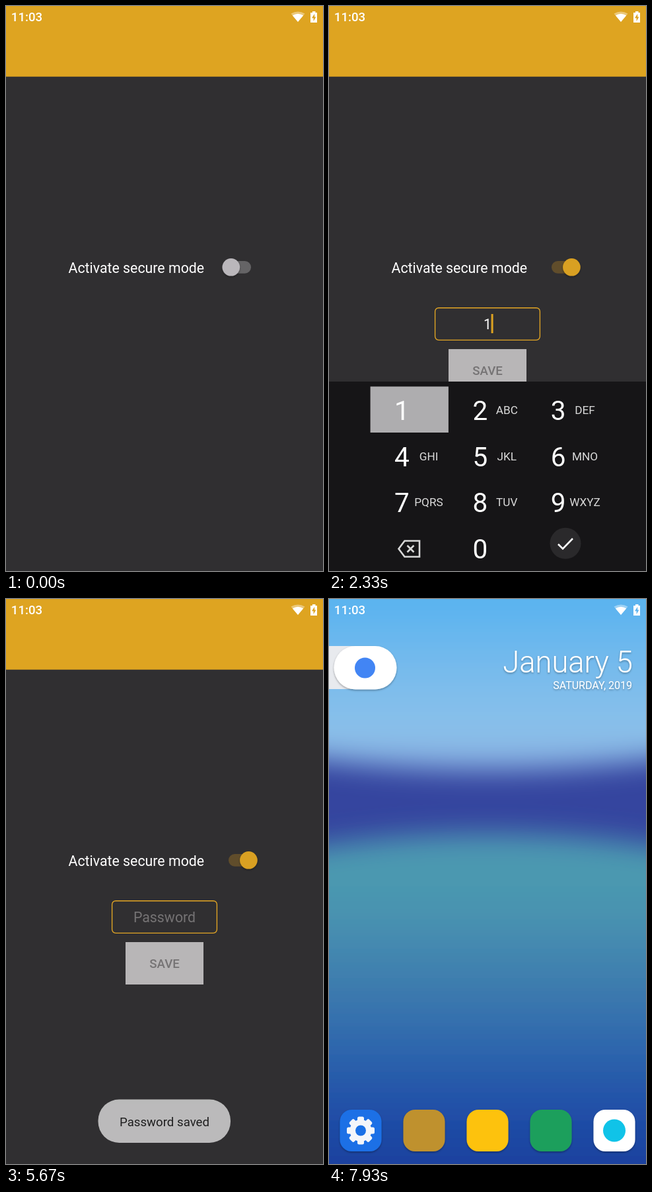
These frames come from a looping animation (480 px wide and 853 px high, 8 s). An HTML page:

```html
<!DOCTYPE html>
<html lang="en">
<head>
<meta charset="utf-8">
<title>Secure mode</title>
<style>
  html, body { margin: 0; width: 100%; height: 100%; overflow: hidden; background: #302f31; }
  svg { display: block; width: 100%; height: 100%; }
  text { font-family: Roboto, sans-serif; white-space: pre; }
  .mid { text-anchor: middle; }
  .end { text-anchor: end; }
</style>
</head>
<body>
<svg viewBox="0 0 480 853">
  <defs>
    <linearGradient id="sky" gradientUnits="userSpaceOnUse" x1="0" y1="0" x2="0" y2="260">
      <stop offset="0" stop-color="#58b3f0"/>
      <stop offset=".4" stop-color="#76baec"/>
      <stop offset=".75" stop-color="#8ac1ea"/>
      <stop offset="1" stop-color="#86abdf"/>
    </linearGradient>
    <linearGradient id="sea" gradientUnits="userSpaceOnUse" x1="0" y1="340" x2="0" y2="853">
      <stop offset="0" stop-color="#4d92b3"/>
      <stop offset=".16" stop-color="#4b9aaf"/>
      <stop offset=".3" stop-color="#478fb0"/>
      <stop offset=".48" stop-color="#3d7bae"/>
      <stop offset=".65" stop-color="#2e67ad"/>
      <stop offset=".83" stop-color="#2150a8"/>
      <stop offset="1" stop-color="#1a419f"/>
    </linearGradient>
    <filter id="soft" filterUnits="userSpaceOnUse" x="-150" y="-150" width="780" height="1200">
      <feGaussianBlur stdDeviation="21"/>
    </filter>
    <filter id="shade" x="-30%" y="-30%" width="160%" height="170%">
      <feDropShadow dx="0" dy="1.5" stdDeviation="1.5" flood-color="#000" flood-opacity=".35"/>
    </filter>
  </defs>

  <g id="home">
    <rect width="480" height="853" fill="#35459f"/>
    <g filter="url(#soft)">
      <path fill="url(#sky)" d="M-100-100H580V230Q240 288-100 230Z"/>
      <path fill="url(#sea)" d="M-100 388Q240 318 580 388V960H-100Z"/>
    </g>
    <path fill="#e8eaee" d="M0 71H42V136H0Z"/>
    <rect x="7.5" y="71" width="95" height="65.5" rx="32.7" fill="#fff" filter="url(#shade)"/>
    <circle cx="54.5" cy="104" r="15.5" fill="#4285f4"/>
    <g fill="#fff" filter="url(#shade)">
      <text class="end" x="460" y="110.5" font-size="45.33" font-weight="300">January 5</text>
      <text class="end" x="459" y="136" font-size="16">SATURDAY, 2019</text>
    </g>
    <g id="dock"></g>
  </g>

  <g id="app">
    <rect width="480" height="853" fill="#302f31"/>
    <rect width="480" height="106.67" fill="#dea421"/>
    <text x="94.5" y="403" font-size="21.33" fill="#fff">Activate secure mode</text>
    <rect id="track" x="337" y="385" width="34" height="18.7" rx="9.35"/>
    <circle id="thumb" cy="394.3" r="13.3" filter="url(#shade)"/>
    <g id="form">
      <rect x="160.6" y="455.7" width="158.8" height="48.6" rx="5.5" fill="none" stroke="#e3a624" stroke-width="1.35"/>
      <text id="entry" class="mid" x="240" y="488" font-size="21.33"></text>
      <rect id="caret" y="465" width="3" height="29" fill="#dda321"/>
      <rect x="181" y="518" width="118" height="64" fill="#b8b6b7"/>
      <text class="mid" x="240" y="557.3" font-size="18.67" font-weight="500" fill="#757374">SAVE</text>
    </g>
    <g id="pad">
      <rect y="567" width="480" height="300" fill="#161517"/>
      <rect id="press" y="574.5" width="118.3" height="69.5" fill="#aeadaf"/>
      <g id="keys"></g>
      <path d="M105.5 819.5L114.5 807.5H137V831.5H114.5ZM118.5 814.5L128.5 824.5M128.5 814.5L118.5 824.5"
        fill="none" stroke="#d8d8d8" stroke-width="2.6"/>
      <circle cx="358" cy="811.3" r="23.5" fill="#2a292b"/>
      <path d="M347 812.5L354 819.5L369 804" fill="none" stroke="#fff" stroke-width="2.6"/>
    </g>
    <g id="toast">
      <rect x="139.5" y="755.5" width="200.5" height="65.5" rx="32" fill="#dcdcdc"/>
      <text class="mid" x="240" y="795.5" font-size="18.67" fill="#1b1b1b">Password saved</text>
    </g>
  </g>

  <path id="wave" fill="#050505"/>

  <g id="status" fill="#fff">
    <text x="7.8" y="23.3" font-size="18.67" font-weight="500">11:03</text>
    <path opacity=".4" d="M442 24L431.5 11.5Q442 5.5 452.5 11.5Z"/>
    <path d="M442 24L433.8 14.3Q442 9.3 450.2 14.3Z"/>
    <path fill-rule="evenodd" d="M464 8H468.5V10H471V25H461V10H464ZM467.2 11.7L463 18.3H465.6V23L469.4 16.5H467.2Z"/>
  </g>
</svg>

<script>
const $ = id => document.getElementById(id);
const set = (id, attrs) => {
  for (const k in attrs) $(id).setAttribute(k, attrs[k]);
};
const show = (id, opacity) => set(id, { opacity, visibility: opacity > 0 ? 'visible' : 'hidden' });
const part = (t, a, b) => Math.min(1, Math.max(0, (t - a) / (b - a)));
const ease = p => p * p * (3 - 2 * p);
const within = (t, a, b) => t >= a && t < b;
const mix = (a, b, p) => 'rgb(' + a.map((v, i) => Math.round(v + (b[i] - v) * p)) + ')';

const LOOP = 8000;
const COL = 118.3, ROW = 69.6;

function buildKeys() {
  const letters = ['', 'ABC', 'DEF', 'GHI', 'JKL', 'MNO', 'PQRS', 'TUV', 'WXYZ'];
  const digit = (n, x, y) => `<text class="mid" x="${x}" y="${y}" font-size="40.5" fill="#fff">${n}</text>`;
  $('keys').innerHTML = letters.map((word, i) => {
    const x = 110.5 + (i % 3) * COL, y = 625 + Math.floor(i / 3) * ROW;
    return digit(i + 1, x, y) +
      `<text class="mid" x="${x + 40.5}" y="${y - 9}" font-size="17.2" fill="#dadada">${word}</text>`;
  }).join('') + digit(0, 110.5 + COL, 625 + 3 * ROW);
}

function buildDock() {
  const tiles = ['#1a70e6', '#bf912e', '#fdc20f', '#1f9f5c', '#fff'];
  const tooth = (_, i) =>
    `<rect x="-5" y="-21" width="10" height="12" rx="2.5" transform="rotate(${i * 45})"/>`;
  $('dock').innerHTML = tiles.map((fill, i) =>
    `<rect x="${16.5 + 96 * i}" y="771" width="63" height="63" rx="18" fill="${fill}" filter="url(#shade)"/>`
  ).join('') +
    `<g transform="translate(48 802.5)" fill="#f4f6fa">${Array.from({ length: 8 }, tooth).join('')}
      <circle r="16.5"/><circle r="8" fill="#1a70e6"/></g>
    <circle cx="432" cy="802.5" r="17" fill="#10c3e8"/>`;
}

function drawSwitch(t) {
  const p = ease(part(t, 300, 600));
  set('thumb', { cx: 340.8 + 26.6 * p, fill: mix([186, 183, 187], [217, 160, 32], p) });
  set('track', { fill: mix([101, 100, 102], [96, 77, 43], p) });
  show('form', t >= 400 ? 1 : 0);
}

function drawEntry(t) {
  const typing = within(t, 2200, 3530);
  const value = !typing ? 'Password' : t < 2600 ? '1' : t < 2870 ? '•2' : '••3';
  const entry = $('entry');
  if (entry.textContent !== value) entry.textContent = value;
  set('entry', { fill: typing ? '#fff' : '#757374' });
  const half = typing ? entry.getComputedTextLength() / 2 : 0;
  set('caret', { x: 239.6 + half });
  show('caret', within(t, 1330, 1870) || within(t, 2070, 3470) ? 1 : 0);
}

function drawPad(t) {
  const up = ease(part(t, 1435, 1530)) * (1 - ease(part(t, 3430, 3600)));
  show('pad', up > 0 ? 1 : 0);
  set('pad', { transform: `translate(0 ${286 * (1 - up)})` });
  const key = within(t, 2070, 2470) ? 0 : within(t, 2530, 2730) ? 1 : within(t, 2800, 2930) ? 2 : -1;
  show('press', key < 0 ? 0 : 1);
  set('press', { x: 62.6 + COL * Math.max(0, key) });
}

function drawExit(t) {
  const w = t < 6870 ? 14.5 * ease(part(t, 6690, 6870))
    : (14.5 + 6 * part(t, 6870, 6940)) * (1 - ease(part(t, 6940, 7080)));
  set('wave', { d: `M0 590C${w * .2} 628 ${w} 630 ${w} 682C${w} 730 ${w * .2} 775 0 818Z` });
  show('wave', w > 0 ? 1 : 0);

  const p = ease(part(t, 7000, 7230));
  const s = 1 - .08 * p;
  set('app', { transform: `translate(${240 * (1 - s)} ${426.5 * (1 - s)}) scale(${s})` });
  show('home', t >= 7000 ? 1 : 0);
  $('app').style.opacity = 1 - p;
  $('app').style.display = p < 1 ? '' : 'none';
}

function draw(t) {
  drawSwitch(t);
  drawEntry(t);
  drawPad(t);
  show('toast', part(t, 3570, 3860) * (1 - part(t, 5640, 5800)));
  drawExit(t);
}

function tick() {
  draw(performance.now() % LOOP);
  requestAnimationFrame(tick);
}

buildKeys();
buildDock();
tick();
</script>
</body>
</html>
```
